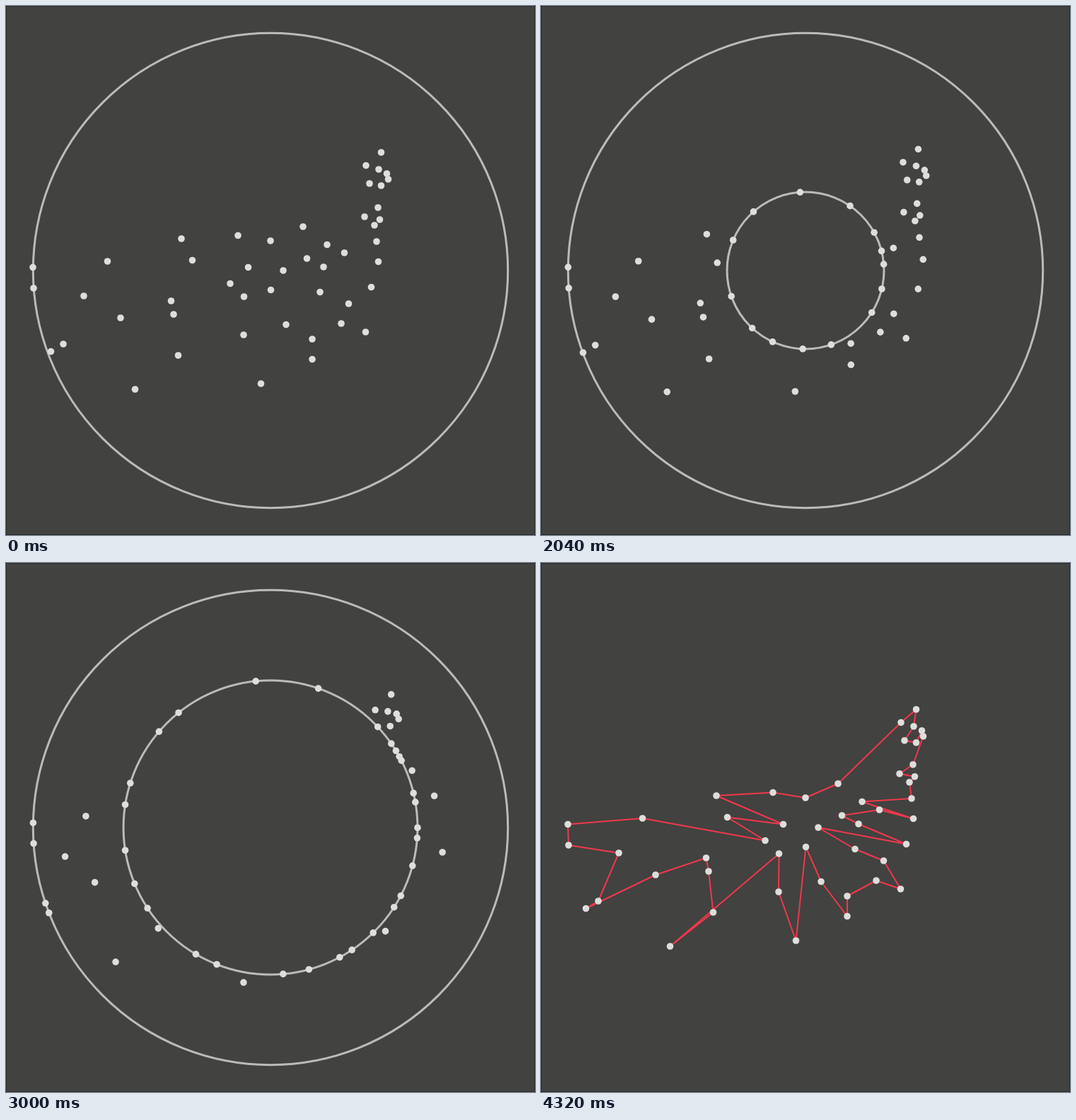
Write an HTML page with a canvas that moves like this. It is 748x748 px and loops after 7.6 s.

```html
<!DOCTYPE html>
<html lang="en">
<head>
<meta charset="utf-8">
<title>Tour by growing circle</title>
<style>
  html, body { margin: 0; height: 100%; overflow: hidden; background: #424240; }
  canvas { display: block; width: 100vw; height: 100vh; }
</style>
</head>
<body>
<canvas id="stage" width="748" height="748"></canvas>
<script>
const ctx = document.getElementById('stage').getContext('2d');
const SIZE = 748, MID = 374, OUTER = 335.7;
const LOOP = 7600, GROW = 1000, TOUR = 4320, STEP = 40;
const PUSH = 0.35, SUBSTEPS = 3, MAX_MOVE = 6;

// The places to visit, in tour order.
const places = [
  [530.5, 207], [527, 231], [514, 251], [530.5, 254], [538.5, 237], [540.5, 245],
  [526, 285], [507, 298], [528.5, 302], [521, 310], [524, 333], [454, 337.5],
  [526.5, 361.5], [478.5, 349], [425.5, 357], [449, 369], [516.5, 397.5], [392, 374],
  [444, 404.5], [484.5, 421], [508.5, 461], [474, 449], [433, 471], [433, 499.5],
  [396, 450.5], [374.5, 401.5], [360.5, 534], [336, 465], [336.5, 411], [182.5, 542],
  [243.5, 494], [237, 436], [233.5, 417], [162, 441], [63.5, 488.5], [81, 478],
  [110, 410], [39, 399], [38, 369.5], [143.5, 361], [317, 392.5], [263.5, 359.5],
  [342.5, 369.5], [248, 329], [328, 324.5], [374, 332], [420, 312], [509, 225.5]
];

const gap = (p, q) => Math.hypot(p[0] - q[0], p[1] - q[1]);
const rest = places.map(p => places.map(q => gap(p, q)));
const radiusAt = n => Math.min(OUTER, 1.9 + 4.04 * n);

// Keep a dot between the growing circle and the outer ring.
function confine([x, y], inner) {
  const dx = x - MID, dy = y - MID, r = Math.hypot(dx, dy);
  const k = Math.min(OUTER, Math.max(inner, r)) / r;
  return [MID + dx * k, MID + dy * k];
}

// Dots squeezed closer than they began push each other apart.
function relax(dots) {
  return dots.map((p, i) => {
    let fx = 0, fy = 0;
    dots.forEach((q, j) => {
      const d = Math.max(2, gap(p, q));
      if (i === j || d >= rest[i][j]) return;
      const f = (rest[i][j] / d) ** 2 - 1;
      fx += f * (p[0] - q[0]) / d;
      fy += f * (p[1] - q[1]) / d;
    });
    const k = Math.min(PUSH, MAX_MOVE / (Math.hypot(fx, fy) || 1)) / SUBSTEPS;
    return [p[0] + fx * k, p[1] + fy * k];
  });
}

const poses = [places];
for (let n = 1; n <= (TOUR - GROW) / STEP; n++) {
  let dots = poses[n - 1];
  for (let s = 1; s <= SUBSTEPS; s++) {
    const inner = radiusAt(n - 1 + s / SUBSTEPS);
    dots = relax(dots.map(p => confine(p, inner))).map(p => confine(p, inner));
  }
  poses.push(dots);
}

function ring(radius) {
  ctx.beginPath();
  ctx.arc(MID, MID, radius, 0, 2 * Math.PI);
  ctx.strokeStyle = '#bbbbb8';
  ctx.lineWidth = 3;
  ctx.stroke();
}

function tour() {
  ctx.beginPath();
  places.forEach(([x, y]) => ctx.lineTo(x, y));
  ctx.closePath();
  ctx.strokeStyle = '#f0384c';
  ctx.lineWidth = 2;
  ctx.lineJoin = 'round';
  ctx.stroke();
}

function draw(t) {
  ctx.fillStyle = '#424240';
  ctx.fillRect(0, 0, SIZE, SIZE);
  ctx.strokeStyle = '#282827';
  ctx.lineWidth = 1;
  ctx.strokeRect(0.5, 0.5, SIZE - 1, SIZE - 1);

  const growing = t >= GROW && t < TOUR;
  const n = growing ? Math.floor((t - GROW) / STEP) + 1 : 0;
  if (t < TOUR) ring(OUTER); else tour();
  if (growing) ring(radiusAt(n));

  ctx.fillStyle = '#dededc';
  for (const [x, y] of poses[n]) {
    ctx.beginPath();
    ctx.arc(x, y, 4.8, 0, 2 * Math.PI);
    ctx.fill();
  }
}

const born = performance.now();
function tick() {
  draw((performance.now() - born) % LOOP);
  requestAnimationFrame(tick);
}
tick();
</script>
</body>
</html>
```
